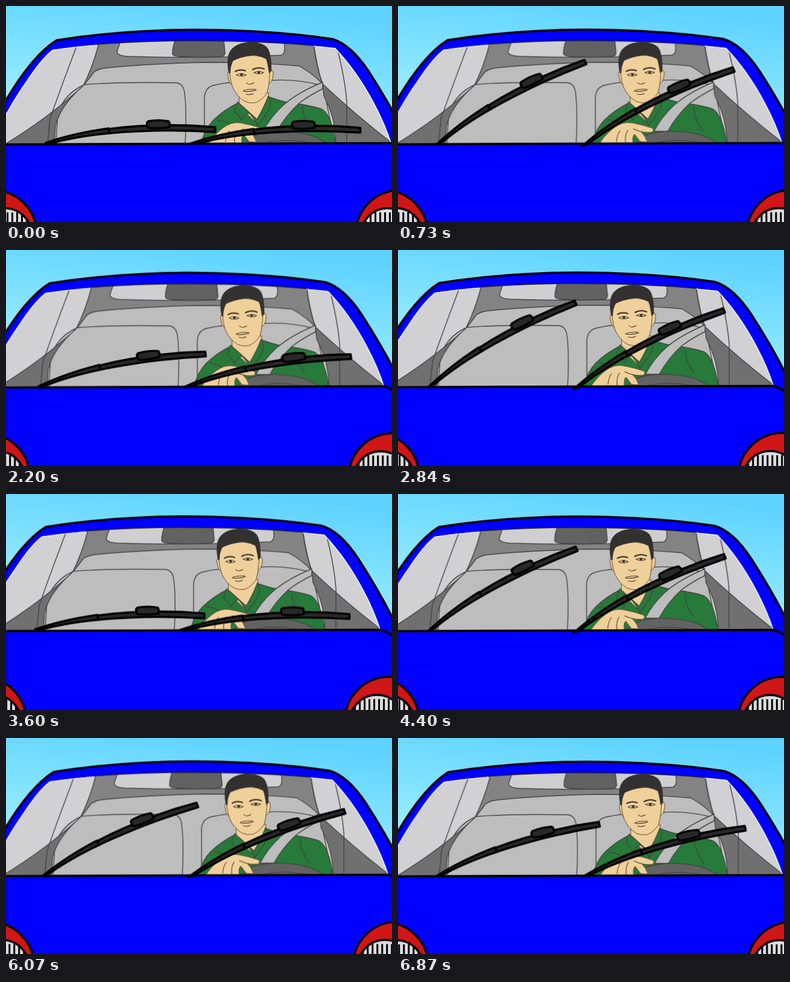
Write an HTML page without scripts that moves like this. It is 640 by 360 pixels and loops after 6.9 s.

```html
<!DOCTYPE html>
<html lang="en">
<head>
<meta charset="utf-8">
<title>Driver behind the wipers</title>
<style>
html, body { margin: 0; width: 100%; height: 100%; overflow: hidden; background: #7ce0ff; }
svg { display: block; width: 100vw; height: 100vh; }
.line { fill: none; stroke: #444; stroke-width: 1.4; stroke-linecap: round; }
.ink { stroke: #000; stroke-width: 3.6; stroke-linejoin: round; stroke-linecap: round; }
.seam { stroke: #444; stroke-width: 1.4; stroke-linejoin: round; }
.skin { fill: #f0d09a; stroke: #5f4a30; stroke-width: 1; stroke-linejoin: round; }
.face { fill: none; stroke: #40352a; stroke-width: 1.1; stroke-linecap: round; }

/* One sway lasts four wiper strokes (7.333 s); the loop cuts both short at 6.9 s. */
.car { animation: sway 6.9s cubic-bezier(.364, 0, .636, 1) infinite; }
.wiper { animation: wipe 6.9s cubic-bezier(.65, 0, .35, 1) infinite; }
.left { --top: -25.7deg; --cut: -10.9deg; transform-origin: 72px 229px; }
.right { --top: -23.5deg; --cut: -10.2deg; transform-origin: 319px 230px; }
@keyframes sway {
  0% { transform: translate(0, 0); }
  53.14% { transform: translate(-18px, -2.3px); animation-timing-function: cubic-bezier(.367, 0, .651, .818); }
  100% { transform: translate(-.62px, -.08px); }
}
@keyframes wipe {
  0%, 26.57%, 53.14%, 79.71% { transform: rotate(0deg); }
  13.28%, 39.86%, 66.43% { transform: rotate(var(--top)); }
  93% { transform: rotate(var(--top)); animation-timing-function: cubic-bezier(.68, 0, .812, .527); }
  100% { transform: rotate(var(--cut)); }
}
</style>
</head>
<body>
<svg viewBox="0 0 640 360" preserveAspectRatio="none">
  <defs>
    <linearGradient id="sky" x1=".6" y1="0" x2=".4" y2="1">
      <stop offset="0" stop-color="#5fd3ff"/>
      <stop offset=".5" stop-color="#98ecff"/>
    </linearGradient>
    <path id="glass" d="M-24 229Q2 170 34 125Q58 88 77 73Q180 58 310 58Q440 58 546 70Q582 108 610 161Q630 199 639 229Z"/>
    <clipPath id="pane"><use href="#glass"/></clipPath>
    <clipPath id="lensClip"><circle cx="633" cy="382" r="44"/></clipPath>
    <pattern id="bars" x="601" width="8" height="40" patternUnits="userSpaceOnUse">
      <rect x="2" width="3" height="40"/>
    </pattern>
    <g id="lamp">
      <circle class="ink" cx="653" cy="380" r="73" fill="#d01616"/>
      <circle cx="633" cy="382" r="45" fill="#dcdcdf"/>
      <rect x="585" y="344" width="90" height="20" fill="url(#bars)" clip-path="url(#lensClip)"/>
      <circle class="ink" cx="633" cy="382" r="45" fill="none"/>
    </g>
    <g id="blade" class="ink" fill="#282828">
      <path d="M66 228Q112 212 170 204L173 212Q118 217 78 228Z"/>
      <path d="M170 205Q258 194 347 202L347 210Q260 204 171 212Z"/>
      <path d="M236 192Q252 189 269 192Q272 193 271 202Q254 205 236 203Q233 199 234 194Z"/>
    </g>
  </defs>

  <rect width="640" height="360" fill="url(#sky)"/>

  <g class="car">
    <path class="ink" fill="#00f" d="M-60 262Q-30 205 0 157Q44 82 84 57Q190 40 312 39.500Q440 40 541 55Q572 64 602 110Q634 160 657 205L672 250Z"/>
    <use href="#glass" fill="#d1d1d4"/>

    <g clip-path="url(#pane)">
      <!-- cabin -->
      <path class="seam" fill="#838383" d="M155 50L153 66Q143 104 128 133L525 133Q514 95 508 50Z"/>
      <path class="seam" fill="#bdbdbe" d="M82 240L86 178Q98 145 130 131L146 110Q154 104 168 103Q240 96 330 94Q420 94 486 100Q508 112 525 130L548 240Z"/>
      <path class="seam" fill="#cfcfd1" d="M194 50Q186 68 184 77Q186 83 202 84Q320 88 456 82Q463 80 462 68L460 50Z"/>
      <path class="seam" fill="#626262" d="M281 56Q276 68 276 80Q278 84 286 84Q325 87 359 84Q364 82 363 76L361 56Z"/>
      <path class="seam" fill="#707070" d="M-6 233Q70 187 128 133Q90 166 82 200L80 233Z"/>
      <path class="seam" fill="#707070" d="M525 130Q580 182 642 230L547 230Q547 188 527 150Z"/>
      <path class="line" d="M119 62Q91 136 73 188L69 228M510 62Q514 100 525 130M548 66Q562 120 565 160L565 228"/>
      <path class="line" d="M130 131Q190 126 283 128Q294 130 296 144Q300 176 297 230M329 230L329 151Q331 135 345 132Q370 126 400 126M437 124Q484 121 525 133"/>

      <!-- driver -->
      <path class="seam" fill="#277a39" d="M323 232Q328 207 344 190Q362 173 384 162L432 150Q450 157 464 160Q508 166 524 172Q541 183 547 232Z"/>
      <path class="skin" d="M386 140L387 170Q401 180 417 197Q420 188 431 171L436 145Z"/>
      <path class="seam" fill="#277a39" d="M384 160Q380 170 379 177Q386 182 391 190Q397 178 404 179Q412 188 417 199Q430 184 437 170Q440 158 435 150Q427 171 416 189Q399 173 384 160Z"/>
      <path class="line" d="M417 198L418 218M350 190Q366 192 374 200M492 169Q492 186 507 208"/>
      <path class="seam" fill="#bdbdbe" d="M525 127Q484 144 460 165Q439 184 426 209L449 209Q464 182 486 162Q503 149 525 138Z"/>
      <path class="skin" d="M434 107Q444 103 443 115Q442 128 433 131ZM372 110Q366 108 368 117Q370 130 375 131Z"/>
      <path class="skin" d="M370 94Q370 120 376 136Q383 151 396 159Q404 163 414 161Q426 156 433 144Q438 126 438 92Q410 72 370 94Z"/>
      <path fill="#333130" d="M369 111Q364 84 373 73Q383 61 405 60Q424 60 433 69Q441 80 440 109L436 112Q434 96 431 88Q421 83 410 82Q389 85 377 91Q372 99 372 113Z"/>
      <path class="face" style="stroke-width:2.2" d="M380 109Q388 105 397 108M409 106Q418 101 428 105"/>
      <path class="face" d="M382 115Q390 110 398 115Q390 119 382 115M411 111Q419 107 427 111Q420 115 411 111M399 128Q402 133 411 128M394 141Q402 138 414 139M393 142Q403 144 415 140M398 147Q404 149 410 146"/>
      <g fill="#333130"><circle cx="390.500" cy="114.300" r="2.300"/><circle cx="419" cy="110.700" r="2.300"/></g>
      <path class="seam" fill="#626262" d="M395 232Q404 215 430 211Q466 206 500 214Q522 220 534 232Z"/>
      <path class="line" d="M418 232Q455 218 509 229"/>
      <path class="skin" d="M334 232Q345 214 360 203Q374 192 390 195Q407 198 424 204Q427 209 421 211Q410 211 405 210Q413 218 415 227L403 226L394 214Q389 218 392 232Z"/>
      <path class="face" d="M370 208Q365 214 364 226M383 207Q378 214 379 227M392 205Q400 209 407 210"/>
      <path fill="none" stroke="#f2f2f4" stroke-width="3" d="M-24 229Q2 170 34 125Q58 88 77 73Q115 67 150 64M510 66L546 70Q582 108 610 161Q630 199 639 229"/>
    </g>
    <path d="M150 64Q230 58 310 58Q420 58 510 66" fill="none" stroke="#222" stroke-width="1.500"/>

    <!-- bonnet -->
    <path class="ink" fill="#00f" d="M-60 231L310 229.500L640 228.500Q658 237 690 254L690 390L-60 390Z"/>
    <use href="#lamp"/>
    <use href="#lamp" transform="matrix(-1 0 0 1 631 0)"/>

    <g class="wiper left"><use href="#blade"/></g>
    <g class="wiper right"><use href="#blade" x="240.500" y="1"/></g>
  </g>
</svg>
</body>
</html>
```
